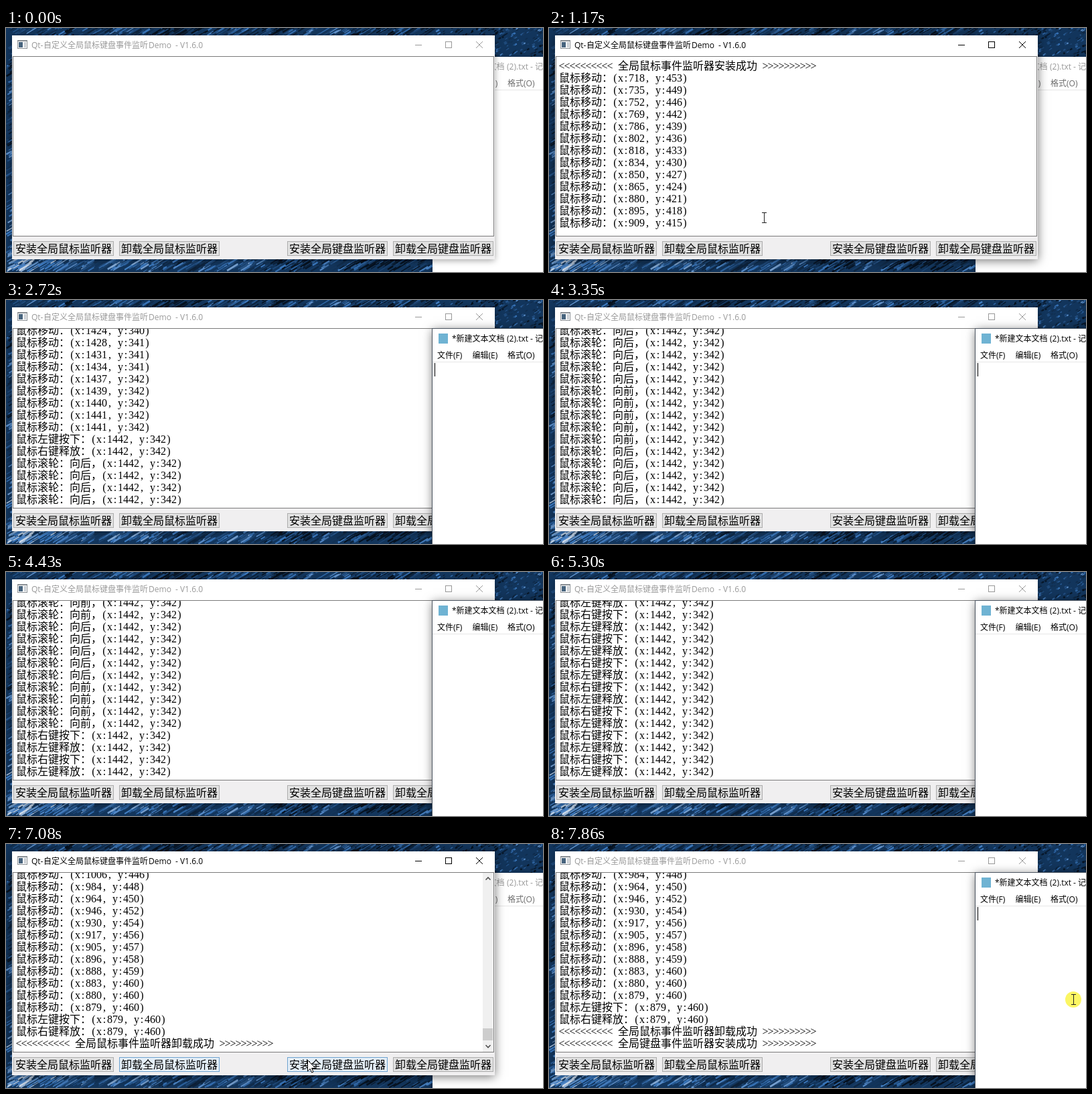
Write an HTML page with a canvas that moves like this. It is 802 px wide and 364 px high and loops after 8 s.

```html
<!DOCTYPE html>
<html lang="zh-CN">
<head>
<meta charset="utf-8">
<title>全局鼠标键盘事件监听</title>
<style>
html, body { margin: 0; width: 802px; height: 364px; overflow: hidden; }
canvas { display: block; }
</style>
</head>
<body>
<canvas id="stage" width="802" height="364"></canvas>
<script>
const W = 802, H = 364, LOOP = 8000;
const OFFSET_X = 588, OFFSET_Y = 132;   // desktop position of the stage
const ctx = document.getElementById('stage').getContext('2d');
const UI = '12px "Open Sans", "Noto Sans CJK SC", sans-serif';
const HAN = '16px "Noto Sans CJK SC", "Noto Sans CJK", sans-serif';
const LATIN = '16px "Liberation Serif", serif';

// ---- Event script: pointer positions and log lines in time order ----
const events = [];
let px = 695, py = 496;

const say = (t, text) => events.push({ t, text, x: px, y: py });
const linear = p => p, speedUp = p => p * p, slowDown = p => 1 - (1 - p) ** 2;

// Moves the pointer from where it is to (x, y) in n steps
function glide(t0, t1, n, x, y, ease = linear, logged = true) {
  const x0 = px, y0 = py;
  for (let i = 1; i <= n; i++) {
    const p = ease(i / n);
    px = Math.round(x0 + (x - x0) * p);
    py = Math.round(y0 + (y - y0) * p);
    say(t0 + (t1 - t0) * i / n, logged ? `鼠标移动：(x:${px}, y:${py})` : '');
  }
}
// Repeats one action, or alternates between several
function burst(t, gap, n, ...names) {
  for (let i = 0; i < n; i++) say(t + i * gap, `鼠标${names[i % names.length]}(x:${px}, y:${py})`);
}
const notice = (t, what) => say(t, `<<<<<<<<<< 全局${what}成功 >>>>>>>>>>`);

const BACK = '滚轮：向后，', FORTH = '滚轮：向前，';
const LEFT = ['左键按下：', '右键释放：'], RIGHT = ['右键按下：', '左键释放：'];

glide(310, 700, 6, 695, 446, linear, false);
glide(830, 940, 2, 700, 456, linear, false);
notice(1020, '鼠标事件监听器安装');
glide(1090, 1480, 66, 1289, 340, slowDown);
glide(1490, 1625, 13, 1395, 340, speedUp);
glide(1640, 1850, 2, 1419, 340);
glide(1930, 2085, 9, 1441, 342, slowDown);
glide(2200, 2250, 1, 1442, 342, linear, false);
burst(2260, 75, 2, ...LEFT);
burst(2710, 2, 4, BACK);
burst(2800, 0, 1, BACK);
burst(2880, 60, 5, FORTH);
burst(3270, 20, 5, BACK);
burst(3730, 50, 4, FORTH);
burst(4050, 125, 4, ...RIGHT);
burst(4590, 28, 12, ...RIGHT);
burst(5070, 122, 6, ...RIGHT);
glide(5850, 5990, 23, 1262, 385);
glide(6000, 6070, 15, 1119, 424, speedUp);
glide(6155, 6230, 5, 1030, 443);
glide(6240, 6520, 12, 879, 460, slowDown);
burst(6600, 100, 2, ...LEFT);
notice(6705, '鼠标事件监听器卸载');
glide(6780, 7070, 20, 1038, 454, linear, false);
notice(7310, '键盘事件监听器安装');
glide(7390, 7800, 30, 1371, 364, linear, false);

const clicks = [940, 6600, 7230, 7850];
const focused = t =>
  t < 940 ? '' : t < 2260 || t >= 6600 && t < 7850 ? 'main' : 'pad';
const caretShown = t => {
  const menuOpen = t > 3880 && t < 5850;
  return focused(t) === 'pad' && !menuOpen && (t - 2260) % 1060 < 780;
};

// ---- Drawing helpers ----
const rect = (x, y, w, h, color) => { ctx.fillStyle = color; ctx.fillRect(x, y, w, h); };
const frame = (x, y, w, h, color) => {
  ctx.strokeStyle = color;
  ctx.lineWidth = 1;
  ctx.strokeRect(x + .5, y + .5, w - 1, h - 1);
};
const stroke = (color, width, path) => {
  ctx.strokeStyle = color;
  ctx.lineWidth = width;
  ctx.stroke(new Path2D(path));
};
const label = (text, x, y, color, font = UI) => {
  ctx.font = font;
  ctx.fillStyle = color;
  ctx.textAlign = 'left';
  ctx.fillText(text, x, y);
};
const panel = (x, y, w, h, active) => {
  ctx.save();
  ctx.shadowColor = `rgba(0,0,0,${active ? .55 : .35})`;
  ctx.shadowBlur = active ? 14 : 9;
  ctx.shadowOffsetY = 2;
  rect(x, y, w, h, '#fff');
  ctx.restore();
};

// Half-width cells for Latin, full-width cells for Han
function cells(text, x, y) {
  ctx.fillStyle = '#000';
  ctx.textAlign = 'center';
  for (const c of text) {
    const wide = c > '\xff', w = wide ? 16 : 8;
    ctx.font = wide ? HAN : LATIN;
    ctx.fillText(c, x + w / 2, y);
    x += w;
  }
}

// Brushed blue backdrop, pale at the lower left and speckled at the upper right
function makeWallpaper() {
  const c = document.createElement('canvas');
  c.width = W;
  c.height = H;
  const g = c.getContext('2d');
  let seed = 7;
  const rnd = () => (seed = seed * 16807 % 2147483647) / 2147483647;
  g.fillStyle = '#12355c';
  g.fillRect(0, 0, W, H);
  for (let i = 0; i < 12000; i++) {
    const x = rnd() * W, y = rnd() * H, speckled = x > 640;
    const glow = 32 * Math.exp(-((x / 260) ** 2) - ((y - 340) / 130) ** 2);
    const band = 9 * Math.sin((x + 1.7 * y) / 24) + 5 * Math.sin((x + 1.4 * y) / 61);
    const light = 20 + glow + band + 45 * (rnd() ** 2 - .3);
    const len = speckled ? 2 + rnd() * 3 : 5 + rnd() * 15;
    g.strokeStyle = `hsl(212 ${70 - light * .35}% ${Math.max(7, Math.min(92, light))}%)`;
    g.lineWidth = .8 + rnd() * 2;
    g.beginPath();
    g.moveTo(x, y);
    g.lineTo(x + len, y - len * .6);
    g.stroke();
  }
  return c;
}
const wallpaper = makeWallpaper();

// ---- Windows ----
function drawLog(lines) {
  const height = lines.length * 18 + 8, view = 267;
  const scroll = Math.max(0, height - view);
  const first = Math.max(0, lines.length - 15);
  ctx.save();
  ctx.beginPath();
  ctx.rect(11, 43, 717, view);
  ctx.clip();
  lines.slice(first).forEach((e, i) => cells(e.text, 15, 62 + (first + i) * 18 - scroll));
  if (scroll) {
    const thumb = Math.max(17, 233 * view / height);
    rect(712, 43, 16, view, '#f0f0f0');
    rect(712, 293 - thumb, 15, thumb, '#cdcdcd');
    stroke('#505050', 1.6, 'M716.5 53.5l3.5-3.5 3.5 3.5M716.5 300l3.5 3.5 3.5-3.5');
  }
  ctx.restore();
}

const buttons = [[11, '安装全局鼠标监听器'], [169, '卸载全局鼠标监听器'], [420, '安装全局键盘监听器'], [578, '卸载全局键盘监听器']];

function drawMain(t, lines, x, y) {
  const active = focused(t) === 'main', ink = active ? '#000' : '#999';
  panel(9, 11, 721, 334, active);
  rect(9, 42, 721, 303, '#f0eff0');

  rect(17, 18, 15, 13, '#8a8f94');
  rect(18, 20, 13, 10, '#fff');
  rect(19, 21, 6, 8, '#46637d');
  rect(27, 21, 3, 8, '#c9ced3');
  label('Qt-', 38, 30, ink);
  label('自定义全局鼠标键盘事件监听', 56, 30, ink);
  label('Demo', 213, 30, ink);
  label('- V1.6.0', 253, 30, ink);
  rect(611, 25, 10, 1, ink);
  frame(656, 20, 10, 10, ink);
  stroke(ink, 1, 'M702 20l10 10m0-10l-10 10');

  rect(10, 42, 719, 269, '#fff');
  frame(10, 42, 719, 269, '#7a7a7a');
  drawLog(lines);

  buttons.forEach(([left, text], i) => {
    const over = t > 820 && x >= left && x < left + 150 && y >= 318 && y < 340;
    const fading = i === 1 && t > 6600 && t < 7200;
    const hot = over || fading;
    rect(left, 318, 150, 22, hot ? '#e4eef7' : '#e1e1e1');
    frame(left, 318, 150, 22, hot ? '#6ea3d0' : '#adadad');
    label(text, left + 3, 335, '#000', HAN);
  });
}

function drawPad(t) {
  const active = focused(t) === 'pad', ink = active ? '#000' : '#999';
  panel(637, 43, 180, 340, active);
  if (active) frame(636, 42, 190, 350, '#4c5560');
  rect(646, 50, 14, 15, '#6fb3d3');
  label('*新建文本文档', 666, 62, ink);
  label('(2).txt', 748, 62, ink);
  label('- 记', 783, 62, ink);
  ['文件(F)', '编辑(E)', '格式(O)']
    .forEach((text, i) => label(text, 644 + i * 52.5, 87, active ? '#000' : '#6d6d6d'));
  rect(637, 92, 165, 1, '#e6e6e6');
  if (caretShown(t)) rect(640, 94, 1, 20, '#000');
}

function drawPointer(t, x, y) {
  if (clicks.some(c => t >= c && t < c + 150)) {
    ctx.fillStyle = '#fbf664';
    ctx.beginPath();
    ctx.arc(x, y, 12, 0, 7);
    ctx.fill();
  }
  ctx.save();
  ctx.translate(x, y);
  const overLog = x > 11 && x < 711 && y > 43 && y < 310;
  const overPad = x > 730 && y > 93;
  if (overLog || overPad) {
    stroke('#222', 1, 'M.5-7.5v15M-3-7.5h7M-3 7.5h7');
  } else {
    const arrow = 'M.5.5V17L4.2 13.4 6.6 19 9 18 6.6 12.4H12Z';
    ctx.fillStyle = '#fff';
    ctx.fill(new Path2D(arrow));
    stroke('#000', 1, arrow);
  }
  ctx.restore();
}

function draw(t) {
  const past = events.filter(e => e.t <= t);
  const last = past[past.length - 1];
  const x = last ? last.x - OFFSET_X : -99, y = last ? last.y - OFFSET_Y : -99;
  const layers = [() => drawPad(t), () => drawMain(t, past.filter(e => e.text), x, y)];
  if (focused(t) === 'pad') layers.reverse();
  ctx.drawImage(wallpaper, 0, 0);
  layers.forEach(paint => paint());
  drawPointer(t, x, y);
}

const start = performance.now();
function tick() {
  draw((performance.now() - start) % LOOP);
  requestAnimationFrame(tick);
}
tick();
</script>
</body>
</html>
```
